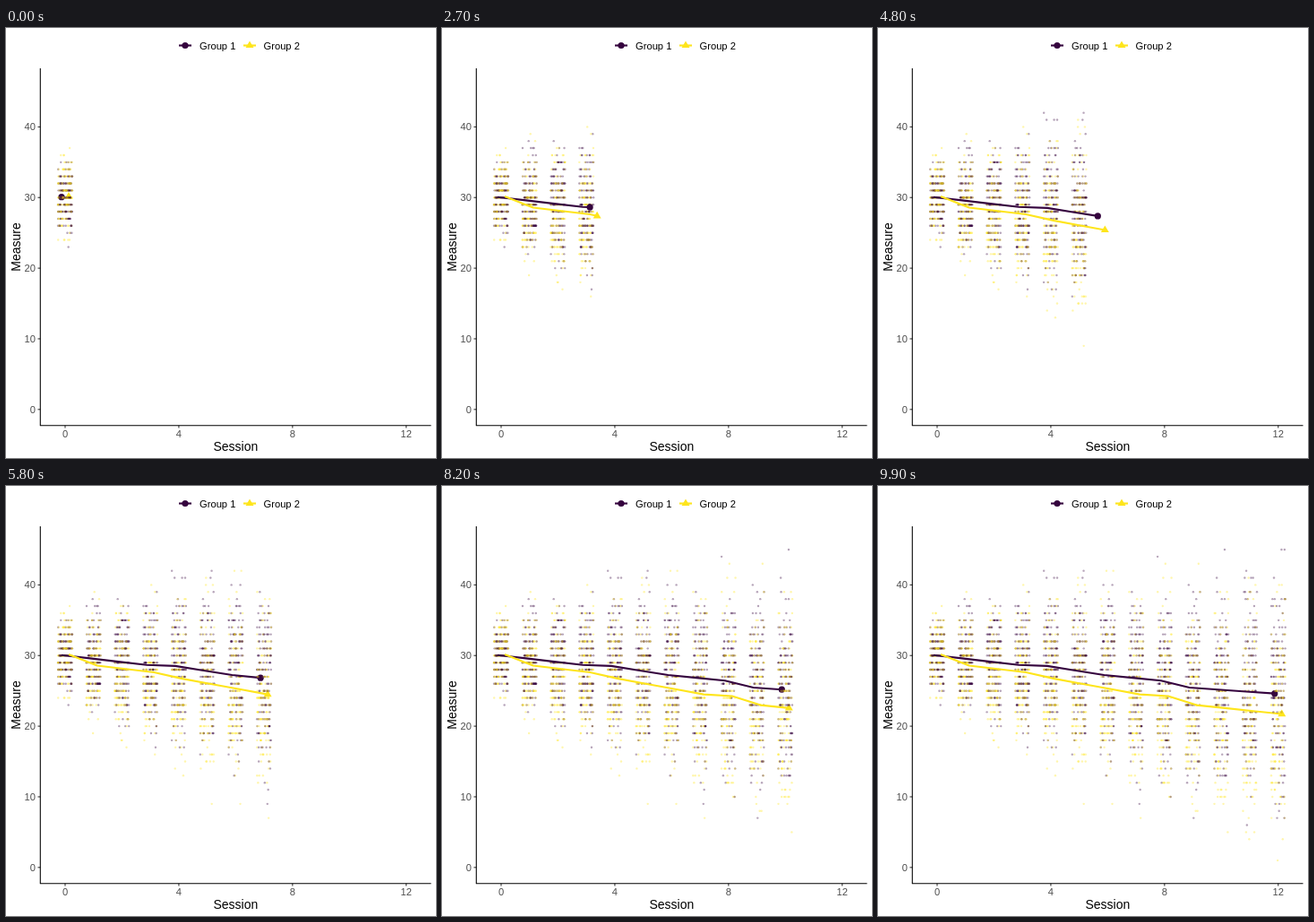
Animation of 480x480 px, one loop 10000 ms. Source, as an HTML page with a canvas:

```html
<!DOCTYPE html>
<html lang="en">
<head>
<meta charset="utf-8">
<title>Measure by session</title>
<style>
html, body { margin: 0; width: 100%; height: 100%; overflow: hidden; background: #fff; }
canvas { display: block; }
</style>
</head>
<body>
<canvas id="chart" width="480" height="480"></canvas>
<script>
const ctx = document.getElementById('chart').getContext('2d');
const FONT = '"Liberation Sans", Arial, sans-serif';
const STEPS = 100, STEP_MS = 100, PEOPLE = 300, SESSIONS = 12;
const LEFT = 38.3, RIGHT = 474.5, TOP = 44.9, BOTTOM = 443.8;

const px = session => 66 + session * 31.73;
const py = value => 425.8 - value * 7.885;

// Each trend is a polyline through a few [session, mean] points
const groups = [
  { name: 'Group 1', color: '#35043e', shift: -4, keyX: 200, textX: 216, trend:
    [[0, 30.07], [3, 28.66], [4, 28.53], [6, 27.24], [8, 26.44], [9, 25.47], [12, 24.62]] },
  { name: 'Group 2', color: '#fee51c', shift: 4, keyX: 272, textX: 287.5, trend:
    [[0, 30.15], [1, 28.57], [3, 27.62], [4, 26.72], [7, 24.5], [8, 24.26], [9, 22.98], [12, 21.72]] }
];

function mean(group, session) {
  const i = Math.max(1, group.trend.findIndex(([s]) => s >= session));
  const [s0, v0] = group.trend[i - 1], [s1, v1] = group.trend[i];
  return v0 + (v1 - v0) * (session - s0) / (s1 - s0);
}

// Sessions land on the nearest step, halves going to the even one
const roundEven = x => x % 1 === 0.5 ? 2 * Math.round(x / 2) : Math.round(x);
const keys = Array.from({ length: SESSIONS + 1 }, (_, k) => roundEven(k * (STEPS - 1) / SESSIONS));

let seed = 7;
function random() {
  seed = (seed + 0x6D2B79F5) | 0;
  let t = Math.imul(seed ^ seed >>> 15, 1 | seed);
  t = t + Math.imul(t ^ t >>> 7, 61 | t) ^ t;
  return ((t ^ t >>> 14) >>> 0) / 4294967296;
}
const normal = () =>
  Math.sqrt(-2 * Math.log(1 - random())) * Math.cos(2 * Math.PI * random());

// Every person keeps one jitter and level; the spread widens with time
const dots = keys.map(() => []);
for (let i = 0; i < PEOPLE; i++) {
  const group = groups[i % 2], dx = random() * 16 - 8, level = normal();
  dots.forEach((list, k) => {
    const spread = 2.6 + 1.1 * k ** 0.62;
    const v = Math.round(mean(group, k) + spread * (0.85 * level + 0.53 * normal()));
    const root = Math.sqrt(k);
    if (v >= 23 - 6.6 * root && v <= 37 + 2.7 * root)
      list.push({ color: group.color, x: px(k) + dx, y: py(v) });
  });
}

function line(points, color, width) {
  ctx.strokeStyle = color;
  ctx.lineWidth = width;
  ctx.lineJoin = 'round';
  ctx.beginPath();
  points.forEach(([x, y]) => ctx.lineTo(x, y));
  ctx.stroke();
}

function text(str, x, y, size, color, align) {
  ctx.font = `${size}px ${FONT}`;
  ctx.fillStyle = color;
  ctx.textAlign = align;
  ctx.fillText(str, x, y);
}

function disc(x, y, r) {
  ctx.beginPath();
  ctx.arc(x, y, r, 0, 2 * Math.PI);
  ctx.fill();
}

function marker(group, x, y) {
  ctx.fillStyle = group.color;
  if (group === groups[0]) return disc(x, y, 3.6);
  ctx.beginPath();
  ctx.moveTo(x, y - 5);
  ctx.lineTo(x + 4.5, y + 2.6);
  ctx.lineTo(x - 4.5, y + 2.6);
  ctx.fill();
}

function drawDots(k) {
  ctx.globalAlpha = 0.36;
  for (const { color, x, y } of dots[k]) {
    ctx.fillStyle = color;
    disc(x, y, 1.2);
  }
  ctx.globalAlpha = 1;
}

function drawAxes() {
  ctx.fillStyle = '#fff';
  ctx.fillRect(0, 0, 480, 480);
  for (let s = 0; s <= SESSIONS; s += 4) {
    line([[px(s), BOTTOM], [px(s), BOTTOM + 2.8]], '#333', 1.07);
    text(s, px(s), 457, 11.2, '#4d4d4d', 'center');
  }
  for (let v = 0; v <= 40; v += 10) {
    line([[LEFT - 2.8, py(v)], [LEFT, py(v)]], '#333', 1.07);
    text(v, 33, py(v) + 4, 11.2, '#4d4d4d', 'right');
  }
  line([[LEFT, TOP], [LEFT, BOTTOM], [RIGHT, BOTTOM]], '#000', 1.07);
  text('Session', 256.3, 472, 14, '#000', 'center');
  ctx.save();
  ctx.translate(15.5, 244.5);
  ctx.rotate(-Math.PI / 2);
  text('Measure', 0, 0, 14, '#000', 'center');
  ctx.restore();
  for (const g of groups) {
    line([[g.keyX - 7, 19.5], [g.keyX + 7, 19.5]], g.color, 2.1);
    marker(g, g.keyX, 19.5);
    text(g.name, g.textX, 24, 11.2, '#000', 'left');
  }
}

function draw(step) {
  const last = keys.filter(k => k <= step).length - 1;
  const atSession = keys[last] === step;
  const now = atSession ? last : last + (step - keys[last]) / (keys[last + 1] - keys[last]);
  const place = (g, s) => [px(s) + g.shift, py(mean(g, s))];

  drawAxes();
  for (let k = 0; k < now; k++) drawDots(k);
  for (const g of groups) {
    const past = keys.slice(0, last + 1).map((_, k) => place(g, k));
    line([...past, place(g, now)], g.color, 2.1);
  }
  for (const g of groups) marker(g, ...place(g, now));
  if (atSession) drawDots(last);
}

const start = performance.now();
let shown = -1;
function tick() {
  const step = Math.floor((performance.now() - start) / STEP_MS) % STEPS;
  if (step !== shown) draw(shown = step);
  requestAnimationFrame(tick);
}
tick();
</script>
</body>
</html>
```
